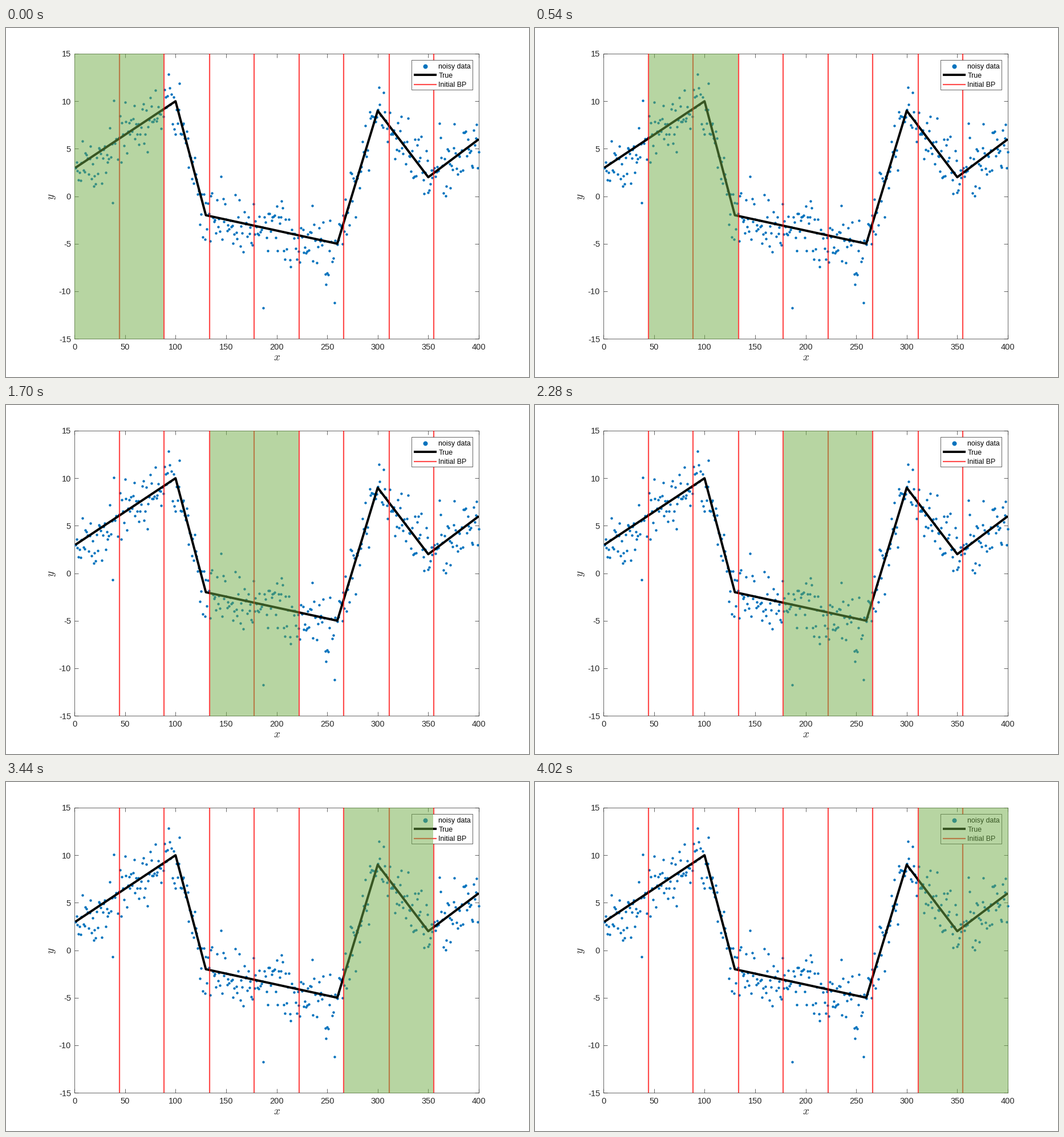
Recreate the animation shown at these times as a matplotlib script. Size 917 by 611 pixels, loop 4600 ms.

```python
import numpy as np
import matplotlib.pyplot as plt
from matplotlib.animation import FuncAnimation
from matplotlib.patches import Rectangle

W, H, DPI = 917, 611, 100
PT = 72 / DPI                       # points per pixel
LEFT, RIGHT, TOP, BOTTOM = 120, 829, 45, 544
STEP = 20                           # ms per frame
FIRST, HOLD, LOOP = 540, 580, 4600  # ms

INK = "#262626"
BLUE = "#0072bd"
GREEN = "#70ad47"

plt.rcParams["font.family"] = "Liberation Sans"
plt.rcParams["mathtext.fontset"] = "cm"

# True piecewise linear signal
knots_x = [1, 100, 130, 260, 300, 350, 400]
knots_y = [3, 10, -2, -5, 9, 2, 6]

# Gaussian noise around it, with a few clear outliers
rng = np.random.default_rng(7)
xs = np.arange(1, 401)
ys = np.interp(xs, knots_x, knots_y) + np.clip(rng.normal(0, 1.7, 400), -3.5, 3.5)
outliers = {38: -.7, 39: 10.1, 93: 12.85, 145: 2.1,
            187: -11.75, 249: -9.3, 257: -11.2, 361: 7.65}
for x, y in outliers.items():
    ys[x - 1] = y

# Eight break points halfway between samples
breaks = np.floor(np.linspace(0, 400, 10))[1:-1] + .5

fig = plt.figure(figsize=(W / DPI, H / DPI), dpi=DPI, facecolor="white")
ax = fig.add_axes([LEFT / W, 1 - BOTTOM / H, (RIGHT - LEFT) / W, (BOTTOM - TOP) / H])
ax.set(xlim=(0, 400), ylim=(-15, 15),
       xticks=range(0, 401, 50), yticks=range(-15, 16, 5))
ax.set_yticklabels([str(v) for v in range(-15, 16, 5)])
ax.tick_params(direction="in", top=True, right=True, length=7 * PT, width=.7 * PT,
               color=INK, labelcolor=INK, labelsize=14.67 * PT)
ax.tick_params(axis="x", pad=8 * PT)
ax.tick_params(axis="y", pad=6 * PT)
for spine in ax.spines.values():
    spine.set(linewidth=.7 * PT, edgecolor=INK)

dots = dict(ls="", marker="o", color=BLUE, mew=0)
truth = dict(color="black", lw=4 * PT, solid_capstyle="butt", solid_joinstyle="round")
mark = dict(color="red", alpha=.7, lw=2.2 * PT, solid_capstyle="butt")

ax.plot(xs, ys, ms=4.4 * PT, zorder=3, clip_on=False, **dots)
ax.plot(knots_x, knots_y, zorder=4, **truth)
for b in breaks:
    ax.axvline(b, zorder=5, **mark)

# Layer in pixel coordinates for labels, legend and the moving window
hud = fig.add_axes([0, 0, 1, 1])
hud.set(xlim=(0, W), ylim=(H, 0))
hud.axis("off")


def label(x, y, text, size, **kw):
    hud.text(x, y, text, fontsize=size * PT, **kw)


label(475, 578, "$x$", 19, color=INK, ha="center", va="center")
label(81, 295, "$y$", 19, color=INK, ha="center", va="center", rotation=90)

hud.add_patch(Rectangle((711, 56), 107, 52, fc="white", ec=INK, lw=.7 * PT))
hud.plot([735], [67], ms=8 * PT, **dots)
hud.plot([715, 755], [82, 82], **truth)
hud.plot([715, 755], [99, 99], **mark)
for y, text in [(71.5, "noisy data"), (87, "True"), (103, "Initial BP")]:
    label(758.5, y, text, 12.4, color="black")

# The window fills the space between the outer red lines
edges = [LEFT - 1, *(LEFT + (RIGHT - LEFT) * breaks / 400), RIGHT + 2]
window = hud.add_patch(Rectangle((LEFT, TOP), 1, BOTTOM - TOP + 1,
                                 fc=GREEN, alpha=.5, lw=0, zorder=10))


def update(i):
    t = i * STEP
    k = 0 if t < FIRST else 1 + (t - FIRST) // HOLD
    window.set_x(edges[k] + 1)
    window.set_width(edges[k + 2] - edges[k] - 2)
    return [window]


anim = FuncAnimation(fig, update, frames=LOOP // STEP, interval=STEP,
                     repeat=True, repeat_delay=0)
plt.show()
```
